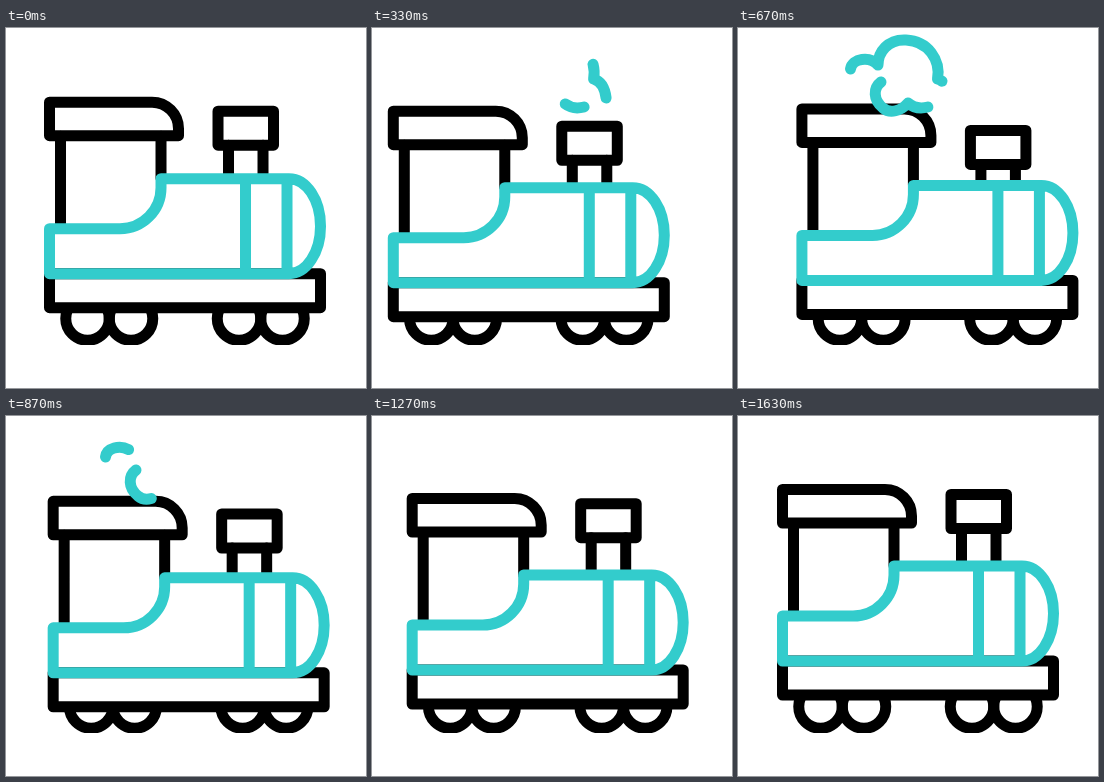
These frames come from a looping animation (360 by 360 pixels, 1.67 s). An HTML page:

```html
<!DOCTYPE html>
<html lang="en">
<head>
<meta charset="utf-8">
<title>Steam train</title>
<style>
  html, body { margin: 0; width: 100%; height: 100%; overflow: hidden; background: #fff; }
  svg { display: block; width: 100%; height: 100%; }
  g, path { stroke-width: 11; stroke-linecap: round; stroke-linejoin: round; }
  .ink { stroke: #000; fill: none; }
  .teal { stroke: #33cccc; fill: none; }
</style>
</head>
<body>
<svg viewBox="0 0 360 360">
  <clipPath id="ground"><rect x="-60" width="480" height="317"/></clipPath>
  <g id="wheels" class="ink" clip-path="url(#ground)">
    <circle cx="81.5" cy="290.5" r="21.75"/>
    <circle cx="125" cy="290.5" r="21.75"/>
    <circle cx="233" cy="290.5" r="21.75"/>
    <circle cx="276.5" cy="290.5" r="21.75"/>
  </g>
  <g id="train">
    <g class="ink">
      <path id="stems"/>
      <path id="cap" d="M212 83H267.500V117H212Z"/>
      <path d="M54.500 108V198M155 108V150"/>
      <path d="M43.500 74H146a26.500 26.500 0 0 1 26.500 26.500V107.500H43.500Z"/>
      <path d="M43.500 245.500H314.500V279.500H43.500Z" fill="#fff"/>
    </g>
    <path class="teal" d="M43.500 245.500V200.500H114A41 41 0 0 0 155 159.500V150.500H283
      A31.500 47.500 0 0 1 283 245.500ZM239.500 151V245M281 151V245"/>
  </g>
  <g id="smoke" class="teal">
    <path id="cloud" pathLength="1" d="M212 70Q210 54 199.500 51C203 32 190 13 168 12C150 11 140 24 140 37C132 28 114 30 112.500 41"/>
    <path id="curl" pathLength="1" d="M190 79Q178 82 170 75C163 83 152 86 145 80C135 72 135 60 143 54"/>
  </g>
</svg>
<script>
const LOOP = 1670;
const $ = id => document.getElementById(id);
const [wheels, train, stems, cap, smoke, cloud, curl] =
  ['wheels', 'train', 'stems', 'cap', 'smoke', 'cloud', 'curl'].map($);

// [time, value] keys, eased in and out
const SWAY = [[-40, 1], [290, -23.5], [680, 20.5], [1055, -12.5], [1400, 1], [1630, 1], [1960, -23.5]];
const BOUNCE = [[-40, -.5], [238, 11.5], [520, 2], [825, 12], [1095, 2.5], [1360, 10.7], [1630, -.5], [1908, 11.5]];
const PUFF = [[0, 0], [670, 12.5], [1050, -3.8], [1630, -4], [1670, 0]];

function ease(t, from, to) {
  const p = Math.min(1, Math.max(0, (t - from) / (to - from)));
  return p * p * (3 - 2 * p);
}

function track(keys, t) {
  let i = 0;
  while (i < keys.length - 2 && t >= keys[i + 1][0]) i++;
  const [t0, a] = keys[i], [t1, b] = keys[i + 1];
  return a + (b - a) * ease(t, t0, t1);
}

function move(el, x, y) {
  el.setAttribute('transform', `translate(${x.toFixed(2)} ${y.toFixed(2)})`);
}

function trim(el, start, end) {
  const len = end - start;
  el.style.display = len > .004 ? '' : 'none';
  el.setAttribute('stroke-dasharray', `${len} 3`);
  el.setAttribute('stroke-dashoffset', -start);
}

function draw(t) {
  const x = track(SWAY, t), puff = track(PUFF, t);
  move(wheels, x, 0);
  move(train, x, track(BOUNCE, t));
  move(cap, 0, puff);
  stems.setAttribute('d', `M222.500 ${117 + puff}V150M257 ${117 + puff}V150`);

  move(smoke, (670 - t) * .065, 0);
  trim(cloud, ease(t, 585, 975), ease(t, 205, 590));
  trim(curl, ease(t, 660, 1115), ease(t, 200, 600));
}

let began;
function tick(now) {
  began ??= now;
  draw((now - began) % LOOP);
  requestAnimationFrame(tick);
}
draw(0);
requestAnimationFrame(tick);
</script>
</body>
</html>
```
